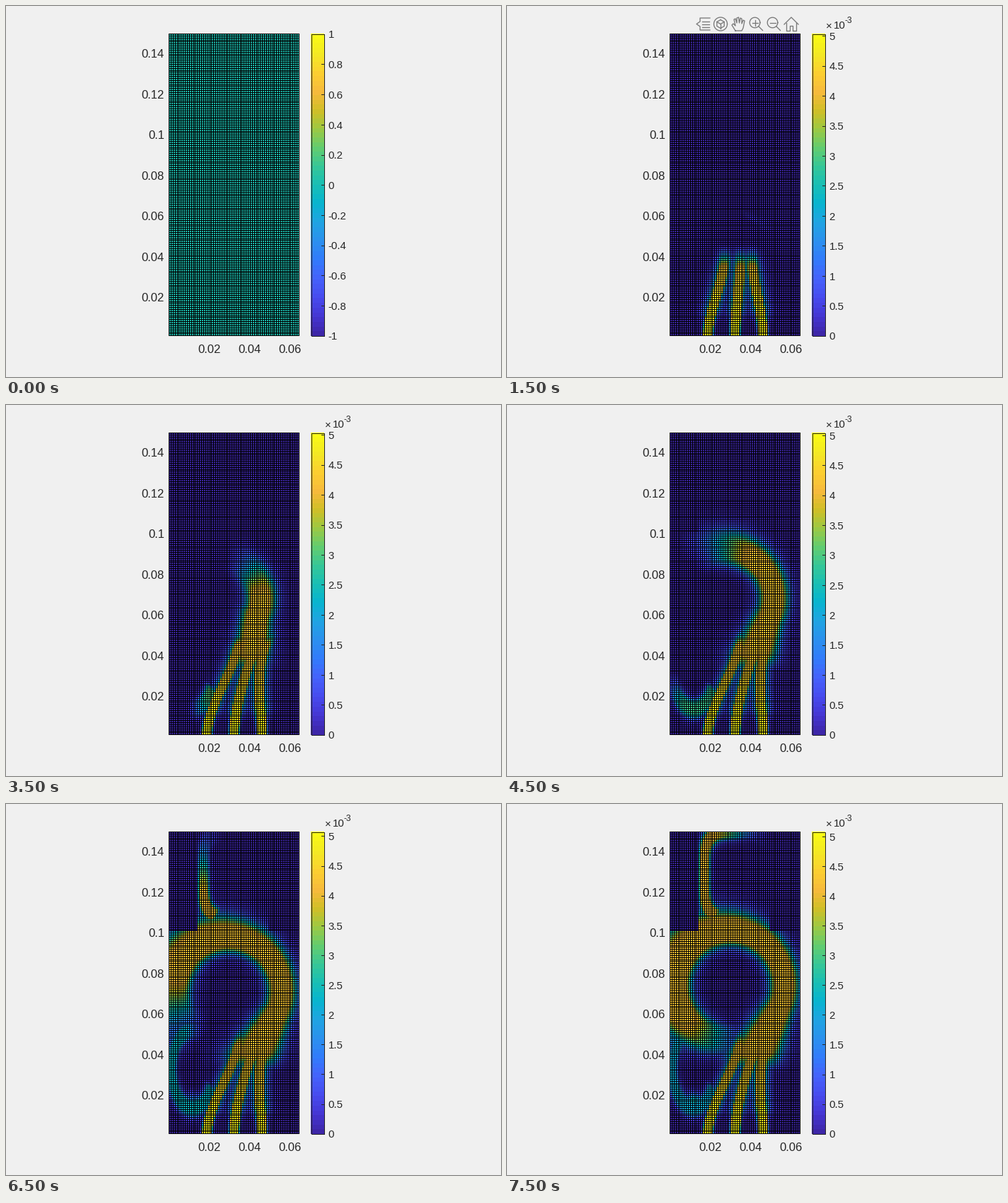
These frames come from a looping animation (700 by 525 pixels, 8000 ms). A matplotlib script:

```python
import numpy as np
import matplotlib.pyplot as plt
from matplotlib.animation import FuncAnimation
from matplotlib.colors import LinearSegmentedColormap
from matplotlib.patches import Rectangle

W, H, DPI = 700, 525, 100
PX = 72 / DPI
INK = "#262626"
STEP = 0.5
FRAMES = 16
NX, NY = 64, 149
LEFT, RIGHT, TOP, BOTTOM = 230, 414, 39, 466

plt.rcParams["font.family"] = "Liberation Sans"

PARULA = LinearSegmentedColormap.from_list("warm_sea", [
    (.242, .150, .660), (.271, .215, .836), (.281, .301, .941),
    (.270, .389, .991), (.196, .485, .989), (.169, .570, .936),
    (.125, .646, .888), (.030, .708, .816), (.096, .750, .712),
    (.216, .784, .592), (.391, .803, .435), (.617, .788, .261),
    (.820, .750, .154), (.973, .730, .239), (.989, .814, .189),
    (.960, .914, .142), (.977, .984, .081)], N=64)

# Cell edges snapped to whole pixels
x_edge = np.floor(np.linspace(LEFT + .6, RIGHT + .4, NX + 1)).astype(int)
y_edge = np.floor(np.linspace(TOP + .4, BOTTOM + .8, NY + 1)).astype(int)
X, Y = np.meshgrid((x_edge[1:] + x_edge[:-1]) / 2 + .5,
                   (y_edge[1:] + y_edge[:-1]) / 2 + .5)
cols = np.clip(np.searchsorted(x_edge, np.arange(LEFT, RIGHT + 1), "right") - 1, 0, NX - 1)
rows = np.clip(np.searchsorted(y_edge, np.arange(TOP, BOTTOM + 1), "right") - 1, 0, NY - 1)
walls = (Y < 180) & ((X < 271) | (X > 372))


def smooth(x):
    x = np.clip(x, 0, 1)
    return x * x * (3 - 2 * x)


def band(d, w, p=5):
    return 1 / (1 + np.abs(d / w) ** p)


def blob(x, y, rx, ry):
    return np.exp(-((X - x) / rx) ** 2 - ((Y - y) / ry) ** 2)


def swirl(cx, cy, rx, ry, turn, start, head, fade, w_in, w_out, n=2):
    """Band around an ellipse from angle start to head; turn 1 is clockwise."""
    dx, dy = (X - cx) / rx, (Y - cy) / ry
    d = ((np.abs(dx) ** n + np.abs(dy) ** n) ** (1 / n) - 1) * np.sqrt(rx * ry)
    ang = (np.degrees(np.arctan2(turn * dy, dx)) - start) % 360
    reach = smooth((head - start - ang) / fade) * smooth(ang / 12)
    return reach * band(d, np.where(d > 0, w_out, w_in))


def jet(x0, lean, t):
    """Inlet jet that rises, leans inward and later drifts to the right."""
    h = 470 - Y
    u = h / 120
    x = x0 + lean * smooth(u) + 18 * u ** 2 * smooth((t - 1.5) / 2)
    reach = smooth((min(87 * t + 5, 165) - h) / 40)
    core = (1 - .13 * smooth(u)) * band(X - x, 7 + 2 * u, 8 - 4 * np.clip(u, 0, 1))
    halo = .42 * smooth((h - 15) / 30) * band(X - x, 13, 4)
    return reach * np.maximum(core, halo)


def trunk(a, b, w_a, w_b):
    """Tapering column from a to b that dissolves into the jets below."""
    ab = np.subtract(b, a)
    s = np.clip(((X - a[0]) * ab[0] + (Y - a[1]) * ab[1]) / (ab @ ab), 0, 1)
    d = np.hypot(X - a[0] - s * ab[0], Y - a[1] - s * ab[1])
    return band(d, w_a + (w_b - w_a) * s) * (1 - smooth((Y - 350) / 40))


def field(t):
    late = t - 3.5
    grow = 1 - np.exp(-max(late, 0) / 1.5)

    # Main ring: widens as it turns, thick in the upper left corner
    cx, cy, r = 304 + 13 * grow, 274 - 1.1 * max(late, 0) ** 2, 56 + 21 * grow
    theta = np.arctan2(cy - Y, X - cx)
    w_out = 21 + 20 * np.cos((theta - np.radians(160)) / 2) ** 4
    ring = swirl(cx, cy, r, r, -1, -40, 90 + 53 * late, 90, 20, w_out)

    a = np.radians(25)
    column = trunk((346, 366), (cx + r * np.cos(a), cy + r * np.sin(a)),
                   25 + 10 * grow, 21)

    # Outlet stream along the wall and the eddy in the lower left corner
    outlet = swirl(325, 100, 46, 60, 1, 115, 180 + 75 * (t - 5.5), 110, 9, 9, 4)
    eddy = swirl(264, 375, 30, 55, 1, 20, min(110 + 75 * late, 310), 70, 10, 10)
    old = smooth((t - 5) / 2.5)

    layers = [jet(284, 24, t), jet(322.5, 8, t), jet(362, -16, t),
              .87 * ring, .87 * smooth((t - 1.5) / .8) * column,
              .85 * outlet, (.62 - .05 * late) * eddy,
              .5 * old * blob(264, 420, 14, 12), .42 * old * blob(238, 325, 22, 28)]
    return np.where(walls, 0, np.max(layers, axis=0))


fig = plt.figure(figsize=(W / DPI, H / DPI), dpi=DPI, facecolor="#f0f0f0")
ax = fig.add_axes([0, 0, 1, 1])
ax.axis("off")


def label(x, y, text, size, ha="left"):
    return ax.text(x, y + .35 * size, text, fontsize=size * PX, color=INK,
                   ha=ha, va="baseline")


def stroke(pts, color=INK, width=1, **kw):
    return ax.plot(*zip(*pts), color=color, lw=width * PX, **kw)[0]


def mesh(values):
    rgb = PARULA(values)[rows][:, cols, :3]
    rgb[:, x_edge - LEFT] = 0
    rgb[y_edge - TOP] = 0
    return rgb


surface = ax.imshow(mesh(np.zeros((NY, NX))), extent=(LEFT, RIGHT + 1, BOTTOM + 1, TOP),
                    interpolation="nearest", aspect="auto")
ax.imshow(np.arange(64)[::-1, None], cmap=PARULA, extent=(431, 450, 467, 39),
          interpolation="nearest", aspect="auto")
ax.add_patch(Rectangle((431.5, 39.5), 18, 427, fill=False, ec=INK, lw=PX))
ax.set_xlim(0, W)
ax.set_ylim(H, 0)

for i in range(1, 8):
    label(224, 469.7 - 57.5 * i, f"{.02 * i:g}", 16.67, "right")
for i in range(1, 4):
    label(230.3 + 57 * i, 485.3, f"{.02 * i:g}", 16.67, "center")

ticks = [stroke([(445.5, 0), (449.5, 0)]) for _ in range(11)]
marks = [label(455.5, 0, "", 15) for _ in range(11)]
exponent = [label(451, 27, "×", 15), label(461.5, 26.7, "10", 15), label(478, 19.5, "-3", 12)]


def toolbar():
    grey = dict(color="#787878", width=1.3, solid_joinstyle="round")
    turn = np.linspace(0, 2 * np.pi, 40)
    circle = lambda x, y, r: [(x + r * np.cos(a), y + r * np.sin(a)) for a in turn]
    shapes = [[(287, 17), (273, 17), (273, 22), (268, 25.5), (273, 29), (273, 34), (287, 34)]]
    shapes += [[(276, y), (286, y)] for y in (21.5, 25.5, 29.5)]
    hexa = [(302 + 6 * np.sin(a), 25.5 - 6 * np.cos(a)) for a in np.arange(7) * np.pi / 3]
    shapes += [circle(302, 25.5, 9.5), hexa]
    shapes += [[(302, 25.5), hexa[i]] for i in (1, 3, 5)]
    shapes += [[(323, 35), (318, 27), (320, 25), (323, 28), (321, 19), (323, 18), (325, 24),
                (325, 17), (327.5, 16), (328.5, 24), (330, 17), (332, 18), (332, 25),
                (334, 20), (336, 21), (334, 31), (332, 35), (323, 35)]]
    for x in (350.5, 375.5):
        shapes += [circle(x, 23.5, 7.3), [(x + 5.5, 29), (x + 11, 34.5)],
                   [(x - 4, 23.5), (x + 4, 23.5)]]
    shapes += [[(350.5, 19.5), (350.5, 27.5)]]
    shapes += [[(392, 26), (402, 16), (412, 26)],
               [(395, 24), (395, 34.5), (400, 34.5), (400, 28), (404, 28), (404, 34.5),
                (409, 34.5), (409, 24)]]
    return [stroke(s, **grey) for s in shapes]


icons = toolbar()


def draw(i):
    t = i * STEP
    started = i > 0
    if started:
        lo, step = 0, .5
        hi = 5.03 + .045 * smooth((t - 3.5) / 4) + .05 * smooth(1.5 - t)
        values = field(t) * 5 / hi
    else:
        lo, hi, step = -1, 1, .2
        values = np.full((NY, NX), .5)
    surface.set_data(mesh(values))
    for n, (tick, mark) in enumerate(zip(ticks, marks)):
        v = round(lo + n * step, 1)
        y = 466.7 - 427 * (v - lo) / (hi - lo)
        tick.set_ydata([y, y])
        mark.set_text(f"{v:g}")
        mark.set_y(y + .5 + .35 * 15)
    for part in exponent:
        part.set_visible(started)
    for part in icons:
        part.set_visible(t == 1.5)
    return [surface, *ticks, *marks, *exponent, *icons]


anim = FuncAnimation(fig, draw, frames=FRAMES, interval=1000 * STEP,
                     repeat=True, repeat_delay=0)
plt.show()
```
